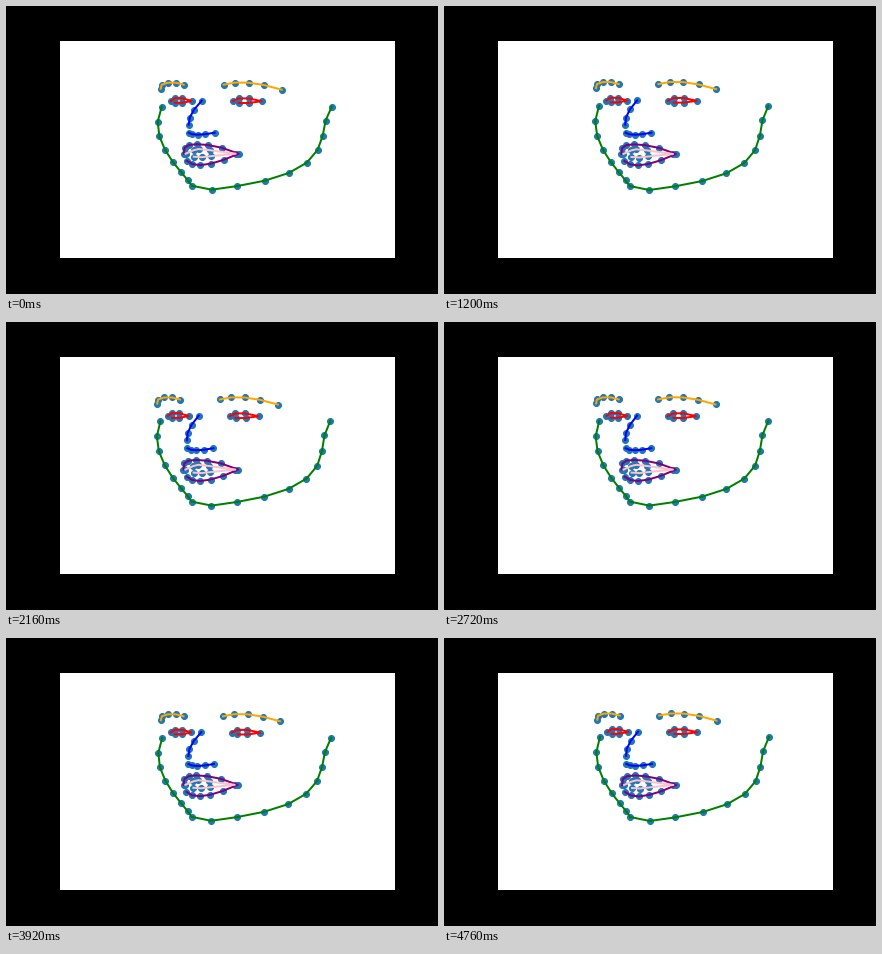
A matplotlib script that plays this animation: 432x288 px, repeating every 4800 ms.

```python
import numpy as np
import matplotlib.pyplot as plt
from matplotlib.animation import FuncAnimation
from matplotlib.patches import Rectangle

W, H, DPI = 432, 288, 72
FRAMES, STEP = 120, 40
OFFSET = -0.3  # marker centres relative to the pixel grid


def curve(keys):
    """One point per whole index on the polynomial through the key points."""
    at = np.array(list(keys))
    xy = np.array(list(keys.values()))
    steps = np.arange(at[0], at[-1] + 1)
    mid = at.mean()
    fits = [np.polyfit(at - mid, xy[:, k], len(at) - 1) for k in (0, 1)]
    return np.column_stack([np.polyval(f, steps - mid) for f in fits])


def eye(left, right, y):
    """Two corners with two points on each lid."""
    inner, outer = left + np.array([0.2, 0.55]) * (right - left)
    top, low = y - 2.8, y + 1.8
    return np.array([(left, y), (inner, top), (outer, top),
                     (right, y), (outer, low), (inner, low)])


jaw = np.vstack([
    curve({0: (156, 101), 1: (152, 116), 4: (167, 156), 7: (186, 180)}),
    curve({8: (206, 184), 10: (259, 175), 12: (301, 157), 14: (317, 130),
           16: (326, 101)}),
])
brow_r = curve({0: (155, 83), 1: (156, 79), 2: (162, 77), 4: (178, 79)})
brow_l = curve({0: (218, 79), 2: (243, 77), 4: (276, 84)})
bridge = curve({0: (196, 95), 2: (184, 112), 3: (183, 119)})
nostrils = curve({0: (183, 127), 2: (192, 129), 4: (209, 127)})
outer_lip = np.vstack([
    curve({0: (178, 148), 1: (179, 142), 3: (191, 138.5), 5: (216, 142),
           6: (233, 148)}),
    curve({0: (233, 148), 2: (205, 158), 5: (181, 155)})[1:],
])
inner_lip = np.vstack([
    curve({0: (180, 148), 1: (188, 144.5), 3: (204, 144.5), 4: (230, 148)}),
    curve({0: (230, 148), 1: (205, 150.5), 2: (196, 151.5),
           3: (188, 151)})[1:],
])

PARTS = [
    (jaw, "green"), (brow_r, "orange"), (brow_l, "orange"),
    (bridge, "blue"), (nostrils, "blue"),
    (eye(165, 186, 95.3), "red"), (eye(227, 256, 95.5), "red"),
    (outer_lip, "purple"), (inner_lip, "pink"),
]

# Head motion: shift of forehead and chin, turn, lift of forehead and chin.
TIMES = [0, 520, 1200, 2160, 3280, 3920, 4760]
HEAD = np.array([
    (0, 0, 0, 0, 0),
    (-4.7, -4.7, -4, -1, -0.2),
    (-3.2, -0.4, -0.8, -0.6, 0.3),
    (-3.8, -0.2, -0.3, -1.2, -0.1),
    (-3, -0.6, -2.4, -1.4, -0.1),
    (-0.6, -0.6, -1.5, -0.4, -0.9),
    (-2.3, 0.1, -1.4, -1.1, -0.7),
])


def pose(points, ms):
    top, low, turn, top_lift, low_lift = (
        np.interp(ms, TIMES, track) for track in HEAD.T)
    x, y = points.T
    side = (x - 205) / 100
    down = np.clip((y - 80) / 70, 0, 1)
    if points is jaw:
        # The outline sways less than the features; its far side does not turn.
        side = 1.5 * np.minimum(side, 0)
        top = (top + low) / 2
        top_lift *= 2
    dx = top + (low - top) * down + turn * side
    dy = top_lift + (low_lift - top_lift) * down
    return np.column_stack([x + dx, y + dy]) + OFFSET


fig = plt.figure(figsize=(W / DPI, H / DPI), dpi=DPI, facecolor="black")
ax = fig.add_axes([0, 0, 1, 1])
ax.set_xlim(0, W)
ax.set_ylim(H, 0)
ax.axis("off")
ax.add_patch(Rectangle((54, 35), 335, 217, fc="white", ec="none", zorder=0))

dots = ax.scatter([], [], s=36, color="#1f77b4", zorder=1)
lines = [ax.plot([], [], color=color, lw=2, zorder=2)[0]
         for _, color in PARTS]


def update(frame):
    shapes = [pose(points, frame * STEP) for points, _ in PARTS]
    dots.set_offsets(np.vstack(shapes))
    for line, xy in zip(lines, shapes):
        line.set_data(*xy.T)
    return [dots, *lines]


anim = FuncAnimation(fig, update, frames=FRAMES, interval=STEP,
                     repeat=True, repeat_delay=0, blit=False)
plt.show()
```
